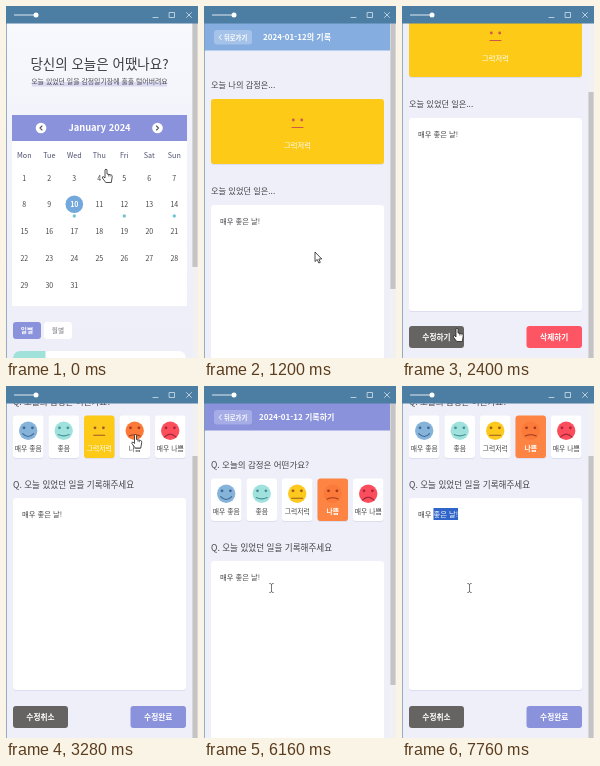
Animation of 192 by 352 pixels, one loop 8000 ms. Source, as an HTML page:

```html
<!DOCTYPE html>
<html lang="ko">
<head>
<meta charset="utf-8">
<title>감정일기장</title>
<style>
  html, body { margin: 0; width: 100%; height: 100%; overflow: hidden; }
  svg { display: block; width: 100vw; height: 100vh; }
  text { font-family: "Noto Sans CJK KR", "Noto Sans CJK", "Noto Sans", sans-serif; white-space: pre; }
</style>
</head>
<body>
<svg id="stage" viewBox="0 0 192 352"></svg>
<script>
const LOOP = 8000, TICK = 80, BAR = 17, VIEW = 335;
const INDIGO = '#8a92dc', BLUE = '#86addf', GRAY = '#666463', RED = '#fd5563', YELLOW = '#fcca17', ORANGE = '#fd8442';
const INK = '#444448', NOTE = '매우 좋은 날!';

const rect = (x, y, w, h, fill, r = 0, extra = '') =>
  `<rect x="${x}" y="${y}" width="${w}" height="${h}" rx="${r}" fill="${fill}" ${extra}/>`;
const dot = (x, y, r, fill, extra = '') => `<circle cx="${x}" cy="${y}" r="${r}" fill="${fill}" ${extra}/>`;
const line = (d, color, w = 1) =>
  `<path d="${d}" fill="none" stroke="${color}" stroke-width="${w}" stroke-linecap="round" stroke-linejoin="round"/>`;
// y is the vertical middle of the text
const text = (x, y, size, str, fill = INK, { mid = false, bold = false, id = '' } = {}) =>
  `<text x="${x}" y="${y + size * 0.37}" font-size="${size}" fill="${fill}" id="${id}"
    text-anchor="${mid ? 'middle' : 'start'}" font-weight="${bold ? 700 : 400}">${str}</text>`;
const label = (x, y, size, str, fill, bold = false, id = '') => text(x, y, size, str, fill, { mid: true, bold, id });
const button = (x, y, w, str, fill) =>
  rect(x, y, w, 22, fill, 3) + label(x + w / 2, y + 11, 7.7, str, '#fff', true);
const panel = (x, y, w, h, fill = '#fff', r = 3, extra = '') =>
  rect(x, y + 1, w, h, '#dcdeee', r) + rect(x, y, w, h, fill, r, extra);

// mood: 2 very good ... -2 very bad
function face(x, y, mood, color) {
  const bend = mood * 2;
  return dot(x - 4.2, y - 3, 1.4, color) + dot(x + 4.2, y - 3, 1.4, color) +
    line(`M${x - 5.5} ${y + 4.5 - bend * .4}Q${x} ${y + 4.5 + bend} ${x + 5.5} ${y + 4.5 - bend * .4}`, color, 1.1);
}

function topBar(fill, light, title, x) {
  return rect(0, 17, 186, 27.5, fill) + rect(10, 24, 38, 14.5, light, 3) +
    line('M17.2 29l-2 2.3l2 2.3', '#fff', .9) + text(20, 31.3, 6.3, '뒤로가기', '#fff', { bold: true }) +
    text(x, 31.3, 8, title, '#fff', { bold: true });
}

function listPage() {
  let s = rect(0, 17, 186, 480, 'url(#sky)') +
    label(93.5, 58.5, 13.5, '당신의 오늘은 어땠나요?', '#3a3a3e') +
    rect(26, 76, 135, 4.5, '#d9daf2') +
    label(93.5, 75.8, 6.9, '오늘 있었던 일을 감정일기장에 훌훌 털어버려요', '#4a4a50') +
    rect(6, 109, 175, 191, '#fff') + rect(6, 109, 175, 26, INDIGO) +
    label(93.5, 122, 9.3, 'January 2024', '#fff', true) +
    dot(35, 122, 5.3, '#fff') + line('M36 120l-2 2l2 2', '#555', 1.1) +
    dot(151.5, 122, 5.3, '#fff') + line('M150.5 120l2 2l-2 2', '#555', 1.1);
  ['Mon', 'Tue', 'Wed', 'Thu', 'Fri', 'Sat', 'Sun'].forEach((d, i) =>
    s += label(18.3 + 25 * i, 149, 7.2, d, '#4c4f70'));
  s += dot(68.3, 198.3, 8.8, '#72a8dc', 'id="today"') + dot(118.3, 198.3, 8.8, '#78aadc', 'id="picked"');
  for (let d = 1; d <= 31; d++) {
    const x = 18.3 + 25 * ((d - 1) % 7), y = 172 + 26.8 * Math.floor((d - 1) / 7);
    s += label(x, y, 7, d, d === 10 ? '#fff' : INK, d === 10, 'day' + d);
    if (d === 10 || d === 12 || d === 14) s += dot(x, 210, 1.7, '#78c4d4', 'class="mark"');
  }
  return s + rect(7, 316, 28, 17, INDIGO, 3) + label(21, 324.5, 6.7, '일별', '#fff', true) +
    rect(38, 316, 28, 17, '#fff', 3) + label(52, 324.5, 6.7, '월별', '#77777c') +
    panel(7, 345, 173, 42, '#fff', 7) +
    `<path id="swatch" d="M14 345H39.500V387H14a7 7 0 0 1-7-7V352a7 7 0 0 1 7-7z"/>` +
    face(23, 366, 0, '#bd6530') +
    text(51, 360, 6.4, '2024-01-12 의 기록', '#85858a') + text(51, 371, 7.6, NOTE);
}

function detailPage() {
  return rect(0, 17, 186, 440, '#eeeff8') +
    topBar(BLUE, '#a5c2e8', '2024-01-12의 기록', 59) +
    text(7, 79, 8.2, '오늘 나의 감정은...') +
    panel(7, 93, 173, 65, YELLOW) + face(93.500, 117, 0, '#cf5848') + label(93.5, 139, 7.3, '그럭저럭', '#fff') +
    text(7, 185, 8.2, '오늘 있었던 일은...') +
    panel(7, 199, 173, 193) + text(16, 215.5, 7.3, NOTE) +
    button(7, 407, 55, '수정하기', GRAY) + button(124.5, 407, 55.5, '삭제하기', RED);
}

function editPage() {
  const moods = [['매우 좋음', '#86b3da', '#3f6690'], ['좋음', '#9fe2dd', '#4a8f95'],
    ['그럭저럭', '#fcc91c', '#9b5a20'], ['나쁨', '#fb7a3a', '#a03a20'], ['매우 나쁨', '#fb4d5c', '#a52638']];
  let s = rect(0, 17, 186, 440, '#eeeff8') +
    topBar(INDIGO, '#a6ace6', '2024-01-12 기록하기', 55) +
    text(7, 79, 8.5, 'Q. 오늘의 감정은 어떤가요?');
  moods.forEach(([name, fill, ink], i) => {
    const x = 7 + 35.5 * i;
    s += panel(x, 92.500, 30.5, 42.5, '#fff', 3, `id="card${i}"`) +
      dot(x + 15.2, 107.8, 9.2, fill) + face(x + 15.2, 107.8, 2 - i, ink) +
      label(x + 15.2, 125, 6.8, name, INK, false, 'mood' + i);
  });
  return s + text(7, 161.5, 8.6, 'Q. 오늘 있었던 일을 기록해주세요') +
    panel(7, 175, 173, 192) + rect(0, 185, 0, 12, '#2f64c8', 0, 'id="mark"') +
    text(16, 190.8, 7.3, '<tspan id="plain"></tspan><tspan id="chosen" fill="#fff"></tspan>', INK, { id: 'note' }) +
    button(7, 383, 55, '수정취소', GRAY) + button(124.5, 383, 55.5, '수정완료', INDIGO);
}

const chrome = rect(0, 17, .8, 335, '#7f9db5') + rect(186, 17, 6, 335, '#f1f1f3') +
  rect(186.4, 17, 5.2, 0, '#c4c4c6', 0, 'id="thumb"') +
  rect(0, 0, 192, 17.5, '#4c7da2') +
  line('M8.500 9H28', '#dfe9f1', 1.2) + dot(30, 9, 2.5, '#fff') +
  line('M147 11.5h5', '#d5e2ec', .8) + line('M163.500 6.500h5v5h-5z', '#d5e2ec', .8) +
  line('M180.500 6.500l5 5m0-5l-5 5', '#d5e2ec', .8);

const pointers = {
  arrow: '<path d="M0 0V9.500L2.200 7.500L3.800 11L5.300 10.300L3.800 7H6.800z" fill="#fff" stroke="#222" stroke-width=".8"/>',
  hand: '<path d="M-1 .8Q0-.6 1 .8V5L5.300 6Q6.400 6.300 6.200 7.800L5.300 13.500H-.2L-3.600 9Q-4 7.400-2.400 7.700L-1 9z" fill="#fff" stroke="#222" stroke-width=".8"/><path d="M2.500 5.500v2M4 6v1.700" stroke="#222" stroke-width=".5"/>',
  beam: line('M-1.800-4.500Q0-4.500 0-3.500Q0-4.500 1.800-4.500M0-3.500V3.500M-1.800 4.500Q0 4.500 0 3.500Q0 4.500 1.800 4.500', '#55555a', .8)
};

const stage = document.getElementById('stage');
const group = (id, body) => `<g id="${id}">${body}</g>`;
stage.innerHTML = `<defs><linearGradient id="sky" gradientUnits="userSpaceOnUse" x1="0" y1="17" x2="0" y2="350">
  <stop offset="0" stop-color="#f8f9fd"/><stop offset=".4" stop-color="#f1f2fa"/><stop offset="1" stop-color="#edeef7"/></linearGradient></defs>` +
  group('list', listPage()) + group('detail', detailPage()) + group('edit', editPage()) + chrome +
  group('pointer', Object.entries(pointers).map(([k, v]) => group(k, v)).join(''));

const $ = id => document.getElementById(id);
const set = (id, attrs) => { for (const k in attrs) $(id).setAttribute(k, attrs[k]); };
const show = (id, on) => set(id, { visibility: on ? 'visible' : 'hidden' });

// time, scroll offset
const scrollPath = [[0, 0], [400, 0], [560, 35], [960, 115], [1119, 115], [1120, 0], [1440, 0], [1920, 87],
  [2479, 87], [2480, 63], [3760, 63], [4160, 0], [6240, 0], [6880, 63]];
// time, x, y, pointer shape from then on
const pointerPath = [[0, 100, 163, 'hand'], [240, 100, 163, 'hand'], [400, 118, 195, 'hand'], [560, 123, 213, 'hand'],
  [800, 111, 246, 'hand'], [1120, 111, 246, 'arrow'], [1920, 111, 246, 'arrow'], [2320, 55, 322, 'hand'],
  [2640, 55, 322, 'beam'], [2880, 26, 180, 'beam'], [3040, 26, 50, 'hand'], [3360, 164, 48, 'hand'],
  [3520, 129, 45, 'hand'], [4000, 129, 45, 'arrow'], [4320, 129, 110, 'hand'], [4480, 129, 112, 'hand'],
  [4560, 117, 184, 'beam'], [4800, 117, 184, 'beam'], [5040, 72, 208, 'beam'], [5200, 44, 201, 'beam'],
  [5519, 44, 201, 'beam'], [5520, 67.5, 202, 'beam']];
const selectTimes = [7200, 7360, 7440, 7600, 7760];

function at(path, t) {
  let i = path.findLastIndex(k => k[0] <= t);
  const a = path[i], b = path[i + 1] || a;
  const p = b === a ? 0 : (t - a[0]) / (b[0] - a[0]);
  return a.map((v, n) => typeof v === 'number' ? v + (b[n] - v) * p : v);
}

function drawSelection(n) {
  const cut = NOTE.length - n;
  $('plain').textContent = NOTE.slice(0, cut);
  $('chosen').textContent = NOTE.slice(cut);
  const left = n ? $('note').getStartPositionOfChar(cut).x : 0;
  const right = n ? $('note').getEndPositionOfChar(NOTE.length - 1).x : 0;
  set('mark', { x: left, width: right - left });
}

function draw(t) {
  const page = t < 1120 ? 'list' : t < 2480 ? 'detail' : 'edit';
  const room = VIEW + { list: 125, detail: 87, edit: 63 }[page];
  const scroll = at(scrollPath, t)[1];
  for (const id of ['list', 'detail', 'edit']) set(id, { display: id === page ? 'inline' : 'none' });
  set(page, { transform: `translate(0 ${-scroll})` });
  set('thumb', { y: BAR + scroll * VIEW / room, height: VIEW * VIEW / room });

  const picked = t >= 480;
  show('picked', picked);
  set('today', { fill: picked ? '#c3c8ee' : '#72a8dc' });
  set('day12', { fill: picked ? '#fff' : INK, 'font-weight': picked ? 700 : 400 });
  set('swatch', { fill: picked ? YELLOW : '#a0e1da' });
  document.querySelectorAll('.mark').forEach(m => m.setAttribute('fill', picked ? '#82a9e0' : '#78c4d4'));

  const stepNo = t < 4480 ? 0 : t < 4880 ? 1 : 2;
  set('card2', { fill: [YELLOW, '#fcd24a', '#fff'][stepNo] });
  set('card3', { fill: ['#fff', '#c6a594', ORANGE][stepNo] });
  set('mood2', { fill: ['#fff', '#fdeebb', INK][stepNo] });
  set('mood3', { fill: [INK, '#6a564e', '#fff'][stepNo], 'font-weight': stepNo === 2 ? 700 : 400 });
  if (page === 'edit') drawSelection(selectTimes.filter(s => s <= t).length);

  const [, x, y, shape] = at(pointerPath, t);
  set('pointer', { transform: `translate(${x} ${y})` });
  for (const id in pointers) show(id, id === shape);
}

function frame() {
  const t = performance.now() % LOOP;
  draw(Math.floor(t / TICK) * TICK);
  requestAnimationFrame(frame);
}
frame();
</script>
</body>
</html>
```
